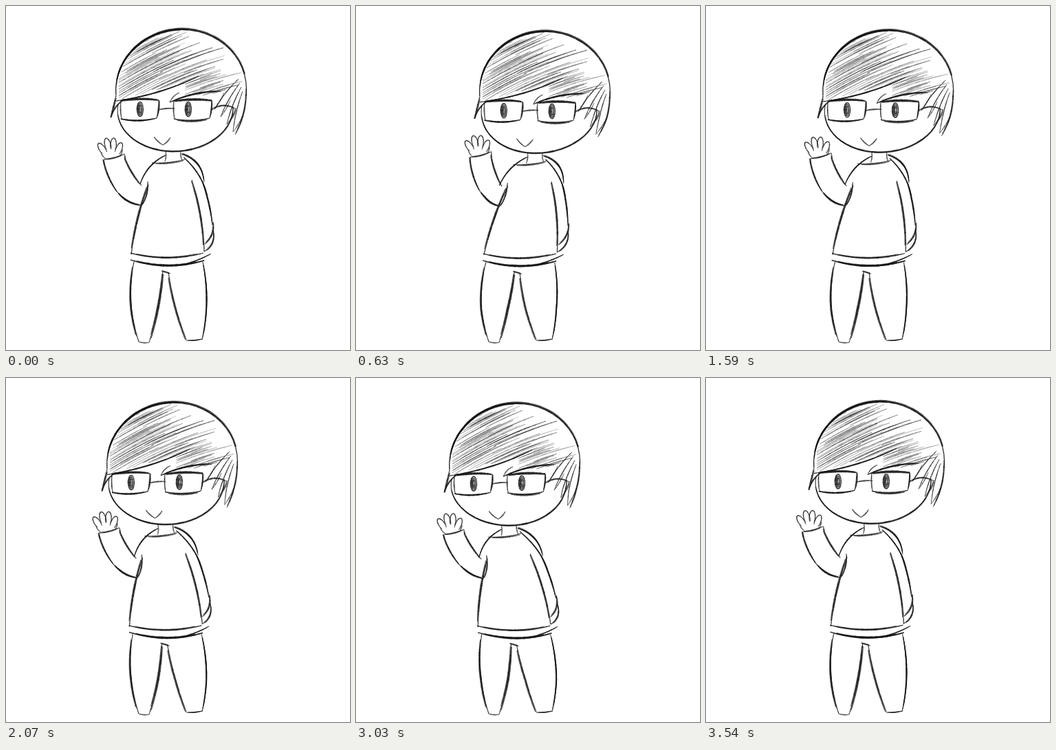
Animation, 500 px wide and 500 px high, one loop 3570 ms. Source, as an HTML page with a canvas:

```html
<!DOCTYPE html>
<html lang="en">
<head>
<meta charset="utf-8">
<title>Waving sketch</title>
<style>
html, body { margin: 0; width: 100%; height: 100%; overflow: hidden; background: #fff; }
canvas { display: block; width: 500px; height: 500px; }
</style>
</head>
<body>
<canvas id="stage" width="500" height="500"></canvas>
<script>
const ctx = document.getElementById('stage').getContext('2d');
const STEP = 30, FRAMES = 119, CYCLE = 120;

let seed = 11;
const rand = () => (seed = (seed * 16807) % 2147483647) / 2147483647;
const spread = r => (rand() - 0.5) * 2 * r;
const lerp = (a, b, k) => a + (b - a) * k;
const clamp = k => Math.max(0, Math.min(1, k));

const strokes = [];
let part = 'body';

// Samples a path; each extra pass is drawn slightly off, like a pencil going over it again
function sketch(path, width, passes = 1, alpha = 0.9) {
  for (let c = 0; c < passes; c++) {
    const ox = c && spread(1.3), oy = c && spread(1.3);
    const from = c ? rand() * 0.12 : 0, to = c ? 1 - rand() * 0.12 : 1;
    const count = 28, pts = [], widths = [];
    for (let i = 0; i <= count; i++) {
      const [x, y] = path(lerp(from, to, i / count));
      pts.push([x + ox, y + oy]);
      widths.push(width * (0.6 + 0.4 * Math.sin(Math.PI * i / count)) * (0.85 + rand() * 0.3));
    }
    strokes.push({ pts, widths, part, alpha: c ? alpha * 0.85 : alpha });
  }
}

// Line between two points, bowed to its left by `bow`
function mark(x1, y1, x2, y2, bow = 0, width = 1.7, passes = 1, alpha) {
  const dx = x2 - x1, dy = y2 - y1, len = Math.hypot(dx, dy);
  sketch(k => {
    const b = bow * 4 * k * (1 - k) / len;
    return [x1 + dx * k + dy * b, y1 + dy * k - dx * b];
  }, width, passes, alpha);
}

function arc(cx, cy, rx, ry, a0, a1, tilt = 0, width = 1.7, passes = 1) {
  sketch(k => {
    const a = lerp(a0, a1, k), x = Math.cos(a) * rx, y = Math.sin(a) * ry;
    return [cx + x * Math.cos(tilt) - y * Math.sin(tilt), cy + x * Math.sin(tilt) + y * Math.cos(tilt)];
  }, width, passes);
}

function drawHair() {
  const PI = Math.PI;
  arc(254.5, 122, 95, 88, PI, PI * 2.06, -0.08, 2.2, 2);
  arc(254.5, 122, 95, 88, PI * 1.08, PI * 1.55, -0.08, 2.6, 2);
  mark(349, 120, 333, 187, 5, 1.6, 2);
  mark(160, 130, 152, 162, 0, 1.8, 2);
  mark(152, 162, 172, 135, 3, 1.5, 2);
  mark(160, 138, 280, 102, -5, 1.8, 2);
  mark(238, 140, 312, 124, 4, 2.2, 2);
  mark(238, 140, 252, 126, 2, 1.4);

  // Locks hanging over the right temple
  for (let i = 0; i < 4; i++) {
    const x = 303 + i * 9, y = 150 + i * 11;
    mark(338 + i * 2, 106 + i * 6, x, y, -2, 1.3);
    mark(x, y, x + 14, y - 24, -1, 1.1);
  }

  // Strands sweep up to the right and flatten towards the crown
  const inside = (x, y) => ((x - 254.5) / 92) ** 2 + ((y - 121) / 84) ** 2 < 1 &&
    y < (x < 260 ? 138 - 0.27 * (x - 160) : 130);
  for (let i = 0; i < 64; i++) {
    const base = 72 + i * 1.9 + spread(2);
    const sweep = x => base - 0.62 * (x - 162) + 0.0011 * (x - 162) ** 2;
    const xs = [];
    for (let x = 162; x < 348; x += 2) if (inside(x, sweep(x))) xs.push(x);
    if (xs.length < 6) continue;
    const a = i % 2 ? rand() * 0.5 : 0, b = Math.min(1, a + 0.35 + rand() * 0.5);
    const at = k => xs[Math.round(k * (xs.length - 1))];
    const x1 = at(a), x2 = at(b);
    sketch(k => { const x = lerp(x1, x2, k); return [x, sweep(x)]; },
      0.8 + rand() * 0.7, 1, 0.35 + rand() * 0.45);
  }
}

function drawFace() {
  arc(246, 150, 84, 61, Math.PI * 1.06, 0, -0.05, 1.8, 2);
  mark(299, 151, 333, 149, 5, 1.5, 2);
  mark(333, 148, 327, 165, 2, 1.3);

  for (const x of [167, 244]) {
    mark(x, 138, x + 55, 137, 2, 2.8, 2);
    mark(x + 55, 137, x + 52, 163, 1, 2, 2);
    mark(x, 164, x + 52, 163, -3, 2.3, 2);
    mark(x, 138, x + 1, 164, -1, 1.7);
  }
  mark(221, 151, 245, 149, 1, 2);

  for (const x of [195, 265])
    for (const r of [4.4, 2.8, 1.2]) arc(x, 150, r, r * 1.5 + 4, 0, Math.PI * 2, 0, 1.9);
  mark(215, 190, 228, 202, -1);
  mark(228, 202, 239, 191, -1);
}

function drawBody() {
  mark(232, 211, 231, 226, 1, 1.5);
  mark(254, 211, 256, 224, -1, 1.5);
  mark(212, 228, 260, 223, -2, 1.5, 2);
  mark(232, 217, 195, 259, -6, 1.7, 2);
  mark(255, 215, 288, 256, 9, 1.7, 3);
  mark(258, 220, 293, 276, 5, 1.6, 2);

  mark(207, 260, 182, 361, -3, 2, 2);
  mark(270, 253, 288, 357, 4, 1.9, 2);
  mark(285, 254, 300, 318, 2, 2.1, 2);
  mark(301, 314, 289, 346, 5, 1.8, 2);
  mark(301, 325, 288, 357, 6, 1.8, 2);

  mark(181, 359, 287, 359, -7, 2, 2);
  mark(181, 369, 288, 370, -8, 2.4, 3);
  mark(252, 377, 298, 360, -2, 1.5, 2);
}

function drawArm() {
  part = 'arm';
  mark(142, 224, 163, 272, -3, 1.8, 2);
  mark(163, 272, 197, 290, -4, 2, 3);
  mark(172, 219, 197, 261, -2, 1.8, 2);
  mark(142, 223, 172, 215, -2, 1.6, 2);
  mark(142, 223, 143, 232, 0, 1.5);
  mark(172, 215, 174, 223, 0, 1.5);
  mark(197, 290, 206, 255, -3, 1.6, 2);

  // Fingers: narrow loops fanned around the palm
  for (let i = 0; i < 4; i++) {
    const fan = -0.6 + i * 0.33;
    const x = 140 + i * 8, y = 208 - 7 * Math.sin(Math.PI * i / 3);
    arc(x, y, 4.3, 10, Math.PI * 0.8, Math.PI * 2.25, fan, 1.5);
  }
  mark(138, 213, 145, 222, -1, 1.4);
  mark(169, 208, 166, 217, 1, 1.4);
  part = 'body';
}

function drawLegs() {
  mark(186, 372, 193, 488, -8, 1.8, 3);
  mark(286, 372, 285, 485, 6, 1.8, 3);
  mark(228, 386, 208, 489, 3, 1.8, 3);
  mark(236, 387, 262, 485, -3, 1.8, 2);
  mark(226, 385, 239, 389, 0, 1.8, 2);
  mark(193, 488, 208, 489, -1, 1.6);
  mark(262, 486, 285, 484, -1, 1.6, 2);
}

// Sideways sway of head and hand
function sway(n) {
  const p = n / CYCLE, wave = Math.sin(p * Math.PI * 2);
  const ramp = 1 - Math.abs(p - 0.75) * 4;
  return {
    head: 28.5 * (p < 0.25 ? p * 4 : wave),
    hand: p < 0.5 ? 28 * wave : -24 * ramp
  };
}

function bend(x, y, head, hand, part) {
  const low = clamp((y - 160) / 66);
  const hips = clamp((y - 226) / 149);
  const feet = clamp((y - 375) / 65);
  const pull = lerp(lerp(1 - 0.17 * low, 0.13, hips), 0, feet);
  const drop = 0.13 * (1 - clamp((y - 226) / 214));
  let dx = head * pull;
  let dy = Math.abs(head) * drop + 0.0006 * head * (x - 235) * (1 - low);
  if (part === 'arm') {
    const tip = 1 - clamp((y - 215) / 75);
    const k = clamp((208 - x) / 38);
    dx = lerp(dx, hand * lerp(0.65, 1, tip), k);
    dy = lerp(dy, -hand * (hand > 0 ? 0.15 : 0.33) * tip, k);
  }
  return [x + dx, y + dy];
}

function render(n) {
  const { head, hand } = sway(n);
  ctx.globalAlpha = 1;
  ctx.fillStyle = '#fff';
  ctx.fillRect(0, 0, 500, 500);
  ctx.strokeStyle = '#141414';
  for (const s of strokes) {
    ctx.globalAlpha = s.alpha;
    let prev = null;
    s.pts.forEach(([x, y], i) => {
      const p = bend(x, y, head, hand, s.part);
      if (prev) {
        ctx.lineWidth = s.widths[i];
        ctx.beginPath();
        ctx.moveTo(...prev);
        ctx.lineTo(...p);
        ctx.stroke();
      }
      prev = p;
    });
  }
}

drawHair();
drawFace();
drawBody();
drawArm();
drawLegs();

const start = performance.now();
let shown = 0;
render(0);
function tick() {
  const n = Math.floor((performance.now() - start) / STEP) % FRAMES;
  if (n !== shown) render(shown = n);
  requestAnimationFrame(tick);
}
requestAnimationFrame(tick);
</script>
</body>
</html>
```
